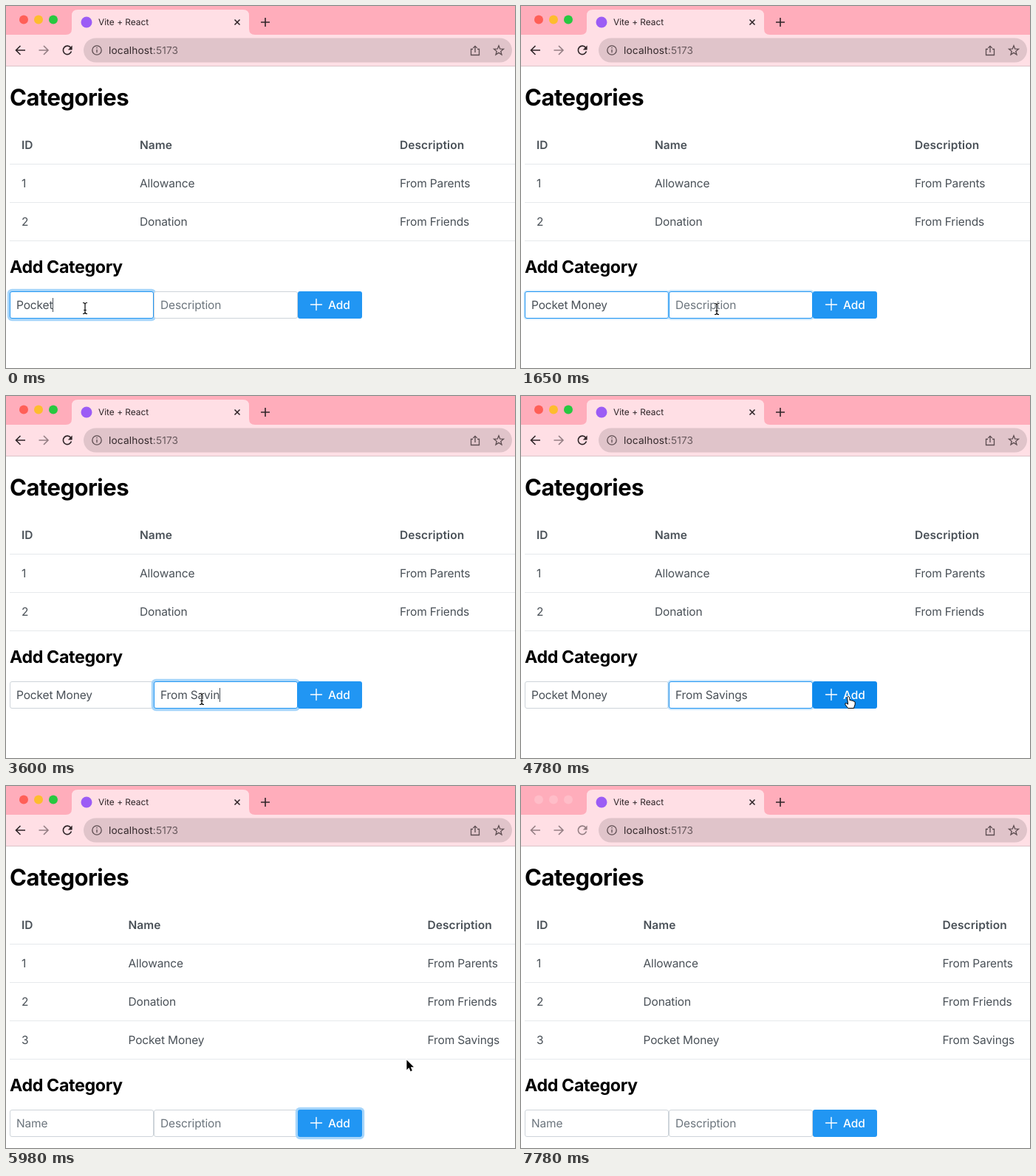
An HTML page for the animation above (7800 ms loop, 689x491 px).

```html
<!DOCTYPE html>
<html lang="en">
<head>
<meta charset="utf-8">
<title>Categories</title>
<style>
  html, body { margin: 0; width: 100%; height: 100%; overflow: hidden; background: #fff; }
  svg { display: block; }
  text {
    font: 400 15.5px Inter, "Liberation Sans", sans-serif;
    font-optical-sizing: none;
    text-rendering: geometricPrecision;
    letter-spacing: -.14px;
    white-space: pre;
    fill: #495057;
  }
  text.h1 { font-size: 31px; font-weight: 700; letter-spacing: -.5px; fill: #000; }
  text.h2 { font-size: 23.25px; font-weight: 700; letter-spacing: -.38px; fill: #000; }
  text.th { font-weight: 600; letter-spacing: .08px; }
  text.tab { font-size: 11.9px; letter-spacing: 0; fill: #2b2225; }
  text.url { font-size: 13.7px; letter-spacing: .15px; fill: #33282b; }
  text.add { font-weight: 500; fill: #fff; }
  .line { fill: none; stroke-width: 1.6; }
</style>
</head>
<body>
<svg id="stage" width="689" height="491" viewBox="0 0 689 491"></svg>
<script>
const LOOP = 7800;
const BLUE = '#2196f3', HOVER = '#0d89ec', RING = '#a6d5fa';
const INK = '#2f2528', MUTED = '#957f84';

const text = (x, y, str, cls = '', id = '') =>
  `<text x="${x}" y="${y}" class="${cls}" id="${id}">${str}</text>`;
const rect = (x, y, w, h, fill, rx = 0, extra = '') =>
  `<rect x="${x}" y="${y}" width="${w}" height="${h}" rx="${rx}" fill="${fill}" ${extra}/>`;
const line = (d, stroke = INK, id = '') =>
  `<path class="line" d="${d}" stroke="${stroke}" id="${id}"/>`;

function star(cx, cy, outer, inner) {
  const points = Array.from({ length: 10 }, (_, i) => {
    const r = i % 2 ? inner : outer, a = i * Math.PI / 5 - Math.PI / 2;
    return (cx + r * Math.cos(a)).toFixed(2) + ' ' + (cy + r * Math.sin(a)).toFixed(2);
  });
  return `M${points.join('L')}Z`;
}

function browser() {
  const lights = [24, 44, 64].map(x => `<circle class="light" cx="${x}" cy="18.5" r="6"/>`).join('');
  return rect(0, 0, 689, 39, '#ffadbb') + lights
    + '<path fill="#ffdfe5" d="M81 39Q89 39 89 31V13Q89 5 97 5H321Q329 5 329 13V31Q329 39 337 39Z"/>'
    + rect(0, 39, 689, 42, '#ffdfe5') + rect(0, 81, 689, 1, '#dcc3c8')
    + '<circle cx="109" cy="22" r="7.5" fill="#9b5cf5"/>'
    + text(125, 26, 'Vite + React', 'tab')
    + line('M309.5 18.5l7 7m0-7l-7 7') + line('M345 22h12m-6-6v12')
    + rect(105, 43.5, 580, 33, '#e0c4ca', 16.5)
    + line('M26 60H13.5m6-6l-6 6 6 6', INK, 'back')
    + line('M44.5 60H57m-6-6l6 6-6 6', MUTED)
    + `<g id="reload">${line('M87.6 56.4A5.7 5.7 0 1 0 88.5 61.6', 'currentColor')}`
    + '<path fill="currentColor" d="M89.6 53.6v5.8h-5.8z"/></g>'
    + `<g stroke-width="1.3" stroke="#5d4d51" fill="none"><circle cx="123" cy="60" r="6.2"/>`
    + '<path d="M123 59v4.3m0-7.2v1.5M632 58.5h-2.5v8h11v-8H638M635 63v-8.5m-2.8 2.6l2.8-2.8 2.8 2.8"/>'
    + `<path d="${star(667, 60.5, 6.8, 2.9)}"/></g>`
    + text(139, 65, 'localhost<tspan fill="#67585c">:5173</tspan>', 'url');
}

function table() {
  const rows = [
    ['ID', 'Name', 'Description'],
    ['1', 'Allowance', 'From Parents'],
    ['2', 'Donation', 'From Friends'],
    ['3', 'Pocket Money', 'From Savings'],
  ];
  return rows.map((cells, r) => `<g id="row${r}">`
    + cells.map((str, c) => text(21, 194 + 52 * r, str, `${r ? '' : 'th'} col${c}`)).join('')
    + rect(5, 214 + 52 * r, 684, 1, '#e6e9ec') + '</g>').join('');
}

const field = (id, x) => `<g id="${id}">`
  + rect(x, 387, 195, 37, RING, 3, 'class="ring"')
  + rect(x + .5, 387.5, 194, 36, '#fff', 2.5, 'class="box"')
  + text(x + 9, 411, '', 'value')
  + rect(0, 396, 1, 19, '#495057', 0, 'class="caret"') + '</g>';

const form = () => '<g id="form">' + text(5, 362, 'Add Category', 'h2')
  + field('name', 5) + field('desc', 200)
  + '<g id="button">' + rect(395, 387, 87, 37, RING, 3, 'class="ring"')
  + rect(395, 387, 87, 37, BLUE, 3, 'class="box"')
  + '<path d="M412.5 405h15m-7.5-7.5v15" stroke="#fff" stroke-width="1.4" stroke-linecap="round"/>'
  + text(436, 411, 'Add', 'add') + '</g></g>';

function cursors() {
  const beam = 'M-3-7.5Q0-7.5 0-5.5Q0-7.5 3-7.5M0-5.5V5.5M-3 7.5Q0 7.5 0 5.5Q0 7.5 3 7.5M-1.8 2.5H1.8';
  return `<g id="beam" fill="none"><path d="${beam}" stroke="#fff" stroke-width="2.6"/>`
    + `<path d="${beam}" stroke="#000" stroke-width="1.2"/></g>`
    + '<path id="hand" fill="#fff" stroke="#000" stroke-linejoin="round" d="M-1.5.5Q0-1.5 1.5.5L2.2 5'
    + 'Q3.5 3.8 4.6 5.4Q6 4.5 7 6Q9 5.5 9.3 8Q9.5 11 8 13.5L7.6 15.5H-.2Q-2.5 13-4 10.5Q-4.8 8.3-2.8 8.6L-.4 10.2Z"/>'
    + '<path id="arrow" stroke="#fff" paint-order="stroke" stroke-width="2"'
    + ' d="M0 0V13.5L3.1 10.6 5.2 15.4 7.4 14.4 5.4 9.8H9.6Z"/>';
}

const stage = document.getElementById('stage');
stage.innerHTML = rect(0, 0, 689, 491, '#fff') + browser()
  + text(5, 135, 'Categories', 'h1') + table() + form() + cursors();

const get = id => document.getElementById(id);
const all = selector => stage.querySelectorAll(selector);
const set = (el, attrs) => { for (const key in attrs) el.setAttribute(key, attrs[key]); };

// The screen refreshes every 150 ms; the rhythm slips by 20 ms after the typing.
const tick = t => t < 4040 ? Math.floor(t / 150) * 150 : Math.floor((t + 20) / 150) * 150 - 20;
const typed = (str, start, t) => str.slice(0, Math.max(0, Math.floor((t - start) / 150) + 1));
const easeOut = power => p => 1 - (1 - p) ** power;
const smooth = p => p * p * (3 - 2 * p);

const moves = [
  { start: 1050, end: 1650, from: [107, 410], to: [265, 411], ease: easeOut(1.45) },
  { start: 3900, end: 4630, from: [265, 411], to: [443, 408], ease: smooth },
  { start: 5530, end: 6580, from: [443, 408], to: [571, 361], ease: easeOut(2.68) },
  { start: 6580, end: 7480, from: [571, 361], to: [655, 497], ease: smooth },
];

function pointer(t) {
  const move = moves.filter(m => t >= m.start).pop() || moves[0];
  const p = Math.min(1, Math.max(0, (t - move.start) / (move.end - move.start)));
  return move.from.map((v, i) => v + (move.to[i] - v) * move.ease(p));
}

function descValue(t) {
  if (t < 3300) return typed('From Sa', 2100, t);
  return t < 3750 ? 'From Sa' + typed('vin', 3300, t) : 'From Savings';
}

function drawRing(el, x, width, focus) {
  const s = 3.2 * focus;
  set(el.querySelector('.ring'), {
    x: x - s, y: 387 - s, width: width + 2 * s, height: 37 + 2 * s, rx: 3 + s, opacity: focus,
  });
}

function drawField(id, x, value, placeholder, focus, caretOn) {
  const el = get(id), label = el.querySelector('.value');
  drawRing(el, x, 195, focus);
  set(el.querySelector('.box'), { stroke: focus ? BLUE : '#ced4da' });
  label.textContent = value || placeholder;
  label.style.fill = value ? '#495057' : '#6c757d';
  const width = value ? label.getComputedTextLength() : 0;
  set(el.querySelector('.caret'), { x: Math.floor(x + 9 + width), opacity: caretOn ? 1 : 0 });
}

function drawCursor(t, x, y, kind) {
  for (const id of ['beam', 'hand', 'arrow']) {
    set(get(id), {
      transform: `translate(${x.toFixed(1)} ${y.toFixed(1)})`,
      visibility: id === kind && t < 7480 ? 'visible' : 'hidden',
    });
  }
}

function render(time) {
  const t = tick(time);
  const added = t >= 4930, active = t < 7780;
  const [x, y] = pointer(t);
  const kind = t >= 5680 ? 'arrow' : x < 395 ? 'beam' : 'hand';

  const columns = added ? [21, 165.5, 570.5] : [21, 181, 533];
  columns.forEach((left, c) => all('.col' + c).forEach(el => set(el, { x: left })));
  set(get('row3'), { visibility: added ? 'visible' : 'hidden' });
  set(get('form'), { transform: `translate(0 ${added ? 52 : 0})` });

  const nameFocus = t < 1650 ? 1 : t < 1800 ? .5 : 0;
  const descFocus = t < 1650 || added ? 0 : t < 1800 || t >= 4780 ? .6 : 1;
  const name = added ? '' : 'Pocket' + typed(' Money', 150, t);
  drawField('name', 5, name, 'Name', nameFocus, t < 1650);
  drawField('desc', 200, added ? '' : descValue(t), 'Description', descFocus, t >= 1800 && t < 4330);
  drawRing(get('button'), 395, 87, added && active ? 1 : 0);
  set(all('#button .box')[0], { fill: kind === 'hand' ? HOVER : BLUE });

  const lights = active ? ['#ff5f57', '#febc2e', '#28c840'] : Array(3).fill('#ffbdc8');
  all('.light').forEach((el, i) => set(el, { fill: lights[i] }));
  set(get('back'), { stroke: active ? INK : MUTED });
  set(get('reload'), { color: active ? INK : MUTED });
  drawCursor(t, x, y, kind);
}

const begin = performance.now();
function loop() {
  render((performance.now() - begin) % LOOP);
  requestAnimationFrame(loop);
}
loop();
</script>
</body>
</html>
```
